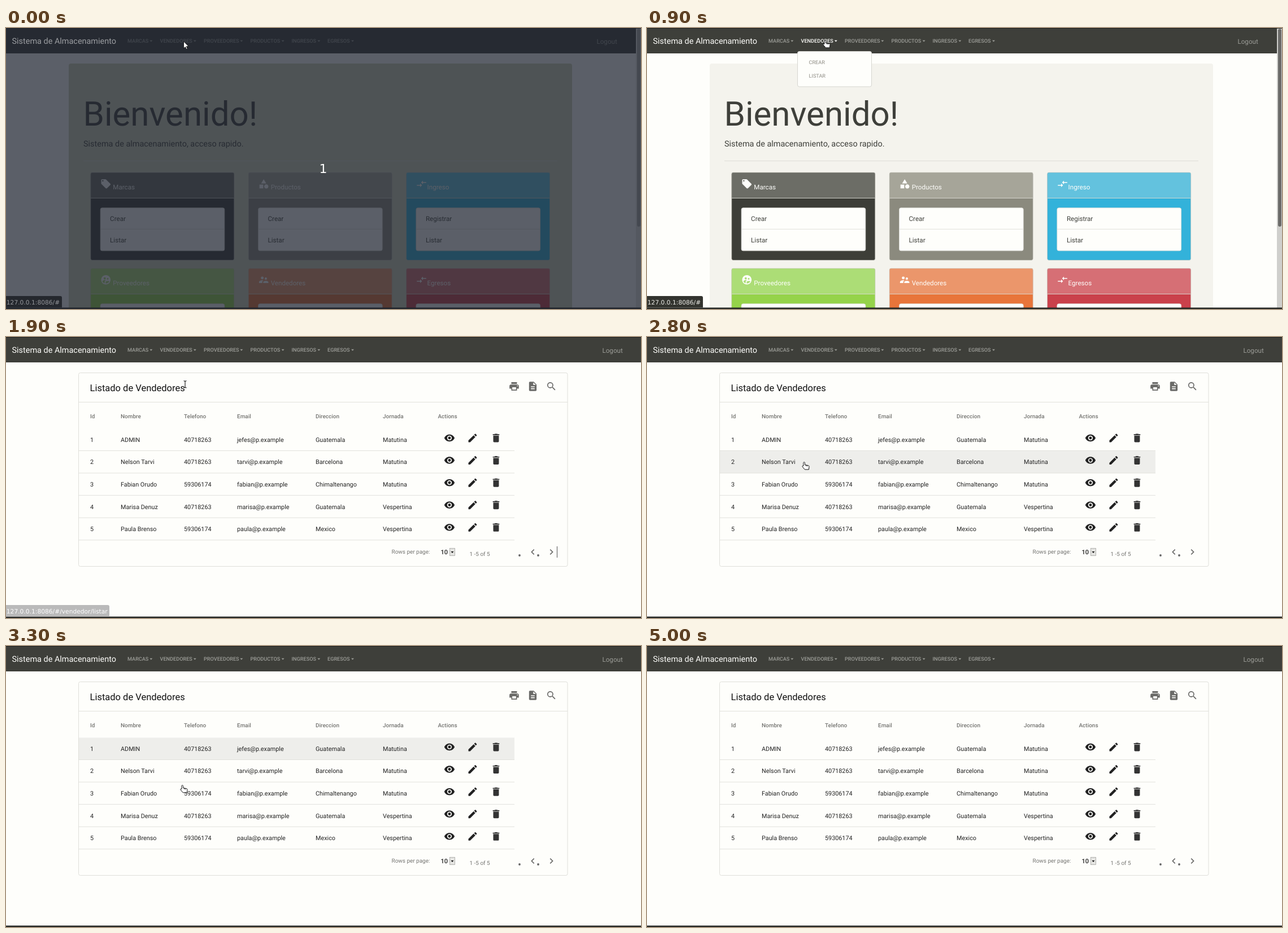
Write an HTML page that moves like this. It is 1124x498 px and loops after 5.8 s.

```html
<!DOCTYPE html>
<html lang="es">
<head>
<meta charset="utf-8">
<title>Sistema de Almacenamiento</title>
<style>
html, body { margin: 0; width: 100%; height: 100%; overflow: hidden; background: #fefefb; }
svg { display: block; width: 1124px; height: 498px; }
text { font-family: Roboto, sans-serif; text-rendering: geometricPrecision; white-space: pre; }
.sys { font-family: "DejaVu Sans", sans-serif; }
</style>
</head>
<body>
<svg id="stage" viewBox="0 0 1124 498"></svg>
<script>
const LOOP = 5800;
const INK = '#3e3f3a', PAPER = '#fefefb', SAND = '#f4f3ed', LINE = '#dfdfda', GREY = '#757572';

const ICONS = {
  tag: 'M21.41 11.58l-9-9C12.05 2.22 11.55 2 11 2H4c-1.1 0-2 .9-2 2v7c0 .55.22 1.05.59 1.42l9 9c.36.36.86.58 1.41.58s1.05-.22 1.41-.59l7-7c.37-.36.59-.86.59-1.41s-.23-1.06-.59-1.42zM5.5 7C4.67 7 4 6.33 4 5.5S4.67 4 5.5 4 7 4.67 7 5.5 6.33 7 5.5 7z',
  shapes: 'M12 2l-5.5 9h11zM3 13.5h8v8H3zM17.5 13a4.5 4.5 0 1 0 .01 0z',
  arrows: 'M9.01 14H2v2h7.01v3L13 15l-3.99-4v3zm5.98-1v-3H22V8h-7.01V5L11 9l3.99 4z',
  people: 'M16.5 12a2.5 2.5 0 1 0 0-5 2.5 2.5 0 0 0 0 5zM9 11a3 3 0 1 0 0-6 3 3 0 0 0 0 6zm7.5 3c-1.83 0-5.5.92-5.5 2.75V19h11v-2.25c0-1.83-3.67-2.75-5.5-2.75zM9 13c-2.33 0-7 1.17-7 3.5V19h7v-2.25c0-.85.33-2.34 2.37-3.47C10.5 13.1 9.66 13 9 13z',
  disc: 'M12 2a10 10 0 1 0 .01 0z',
  discHoles: 'M9.6 6.6a2.3 2.3 0 1 0 .01 0zM15.9 8a1.8 1.8 0 1 0 .01 0zM4.6 15.2c1-1.9 3.2-2.6 5-2.6 1 0 1.8.1 2.5.4-2 1-2.6 2.400-2.600 3.600V19.600c-2.200-.7-4-2.300-4.900-4.400zM11.500 19.800v-3c0-1.600 2.400-2.500 4.400-2.500 1.400 0 2.700.4 3.600 1-1.300 2.700-4.500 4.700-8 4.500z',
  print: 'M19 8H5c-1.66 0-3 1.34-3 3v6h4v4h12v-4h4v-6c0-1.66-1.34-3-3-3zm-3 11H8v-5h8v5zm3-7c-.55 0-1-.45-1-1s.45-1 1-1 1 .45 1 1-.45 1-1 1zm-1-9H6v4h12V3z',
  doc: 'M14 2H6c-1.1 0-1.99.9-1.99 2L4 20c0 1.1.89 2 1.99 2H18c1.1 0 2-.9 2-2V8l-6-6zm2 16H8v-2h8v2zm0-4H8v-2h8v2zm-3-5V3.5L18.5 9H13z',
  search: 'M15.5 14h-.79l-.28-.27A6.5 6.5 0 1 0 13.73 14.43l.27.28v.79l5 4.99L20.49 19zM9.5 14a4.5 4.5 0 1 1 0-9 4.5 4.5 0 0 1 0 9z',
  eye: 'M12 4.5C7 4.5 2.73 7.61 1 12c1.73 4.39 6 7.5 11 7.5s9.27-3.11 11-7.5c-1.73-4.39-6-7.5-11-7.5zM12 17a5 5 0 1 1 0-10 5 5 0 0 1 0 10zm0-8a3 3 0 1 0 0 6 3 3 0 0 0 0-6z',
  edit: 'M3 17.25V21h3.75L17.81 9.94l-3.75-3.75zM20.71 7.04c.39-.39.39-1.02 0-1.41l-2.34-2.34c-.39-.39-1.02-.39-1.41 0l-1.83 1.83 3.75 3.75z',
  bin: 'M6 19c0 1.1.9 2 2 2h8c1.1 0 2-.9 2-2V7H6v12zM19 4h-3.5l-1-1h-5l-1 1H5v2h14V4z',
  prev: 'M15.41 7.41L14 6l-6 6 6 6 1.41-1.41L10.83 12z',
  next: 'M10 6L8.59 7.41 13.17 12l-4.58 4.59L10 18l6-6z'
};

const text = (x, y, size, fill, str, extra = '') =>
  `<text x="${x}" y="${y}" font-size="${size}" fill="${fill}" ${extra}>${str}</text>`;
const rect = (x, y, w, h, fill, extra = '') =>
  `<rect x="${x}" y="${y}" width="${w}" height="${h}" fill="${fill}" ${extra}/>`;
const hline = (x1, x2, y, color = LINE) =>
  `<path d="M${x1} ${y}H${x2}" stroke="${color}" stroke-width=".9"/>`;
const icon = (name, cx, cy, fill) =>
  `<path d="${ICONS[name]}" fill="${fill}" fill-rule="evenodd" transform="translate(${cx - 10} ${cy - 10}) scale(.83)"/>`;
const group = (id, body) => `<g id="${id}">${body}</g>`;

function navItem([label, x, caretX], i) {
  return `<g id="nav${i}" fill="#9c9d98">` +
    `<text x="${x}" y="26.300" font-size="9.130" font-weight="500">${label}</text>` +
    `<path d="M${caretX} 21.800h5l-2.500 2.600z"/></g>`;
}

function card(x, y, [title, iconName, head, body, first]) {
  const gap = iconName === 'arrows' ? 37 : 39.5;
  return rect(x, y, 254, 155.5, body, 'rx="3"') +
    `<path d="M${x} ${y + 45.5}v-42.500q0-3 3-3h248q3 0 3 3v42.500z" fill="${head}"/>` +
    hline(x, x + 254, y + 45.5, '#dcdcd4') +
    rect(x, y, 254, 155.5, 'none', 'rx="3" stroke="#c6c6be" stroke-opacity=".7" stroke-width=".9"') +
    icon(iconName, x + 27, y + 20.3, '#fefefb') +
    (iconName === 'disc' ? icon('discHoles', x + 27, y + 20.3, head) : '') +
    text(x + gap, y + 30.3, 11.62, '#fefefb', title) +
    rect(x + 17.3, y + 62.8, 219.700, 76, PAPER, `rx="3" stroke="${LINE}" stroke-width=".8"`) +
    hline(x + 17.3, x + 237, y + 100.5) +
    text(x + 34.3, y + 85.5, 11.62, INK, first) +
    text(x + 34.3, y + 123.500, 11.62, INK, 'Listar');
}

const nav = [
  ['MARCAS', 215, 254.3], ['VENDEDORES', 272.5, 331.8], ['PROVEEDORES', 350, 414.3],
  ['PRODUCTOS', 432.5, 487.600], ['INGRESOS', 505.5, 551.3], ['EGRESOS', 569, 611]
];
const cards = [
  ['Marcas', 'tag', '#6c6d66', '#3d3e38', 'Crear'],
  ['Productos', 'shapes', '#a6a599', '#8b8a7e', 'Crear'],
  ['Ingreso', 'arrows', '#63c2de', '#33b2da', 'Registrar'],
  ['Proveedores', 'disc', '#acdd76', '#95d34a', 'Crear'],
  ['Vendedores', 'people', '#eb966b', '#e8753a', 'Crear'],
  ['Egresos', 'arrows', '#d66f75', '#ca414b', 'Registrar']
];

const home =
  rect(111, 63, 891, 440, SAND, 'id="jumbo" rx="4"') +
  text(136.5, 172.5, 60, INK, 'Bienvenido!') +
  text(137, 209.5, 14.45, INK, 'Sistema de almacenamiento, acceso rapido.') +
  hline(137, 976, 235.5, '#dcdbd5') +
  cards.map((c, i) => card(149.8 + (i % 3) * 279.4, i < 3 ? 256 : 426, c)).join('');

const scrollbar = rect(1115, 0, 9, 498, '#e2e2df', 'id="track"') +
  rect(1117, 1.5, 6, 350.5, '#a9a9a6', 'id="thumb" rx="3"');

const menu = rect(266.5, 41.5, 131, 62.5, PAPER, 'rx="3" stroke="#d6d6d0"') +
  rect(267, 48, 130, 24.500, SAND, 'id="menuHover"') +
  text(286.5, 63.6, 9.13, '#8e8c84', 'CREAR') +
  text(286.5, 88.4, 9.13, '#8e8c84', 'LISTAR');

const columns = [149, 203, 315, 409, 548, 667, 764.5];
const headings = ['Id', 'Nombre', 'Telefono', 'Email', 'Direccion', 'Jornada', 'Actions'];
const people = [
  ['ADMIN', '40718263', 'jefes@p.example', 'Guatemala', 'Matutina'],
  ['Nelson Tarvi', '40718263', 'tarvi@p.example', 'Barcelona', 'Matutina'],
  ['Fabian Orudo', '59306174', 'fabian@p.example', 'Chimaltenango', 'Matutina'],
  ['Marisa Denuz', '40718263', 'marisa@p.example', 'Guatemala', 'Vespertina'],
  ['Paula Brenso', '59306174', 'paula@p.example', 'Mexico', 'Vespertina']
];
const PITCH = 39.6;

function tableRow(person, i) {
  const dy = i * PITCH;
  return [i + 1, ...person].map((v, c) => text(columns[c], 185.8 + dy, 10.8, '#222', v)).join('') +
    icon('eye', 785, 179 + dy, '#222') +
    icon('edit', 826, 179 + dy, '#222') +
    icon('bin', 867.5, 179 + dy, '#333') +
    hline(129, 900, 201.5 + dy);
}

const list =
  rect(128.5, 63.5, 865.5, 343, PAPER, `rx="3" stroke="${LINE}"`) +
  rect(129, 162.5, 771, 39, '#eeeeeb', 'id="rowHover"') +
  text(148.5, 95.5, 16.5, '#111', 'Listado de Vendedores') +
  ['print', 'doc', 'search'].map((n, i) => icon(n, 899.5 + i * 33, 87.5, '#6a6a68')).join('') +
  hline(129, 994, 115.5) +
  headings.map((h, i) => text(columns[i], 143.8, 9.96, GREY, h, 'font-weight="500"')).join('') +
  people.map(tableRow).join('') +
  text(682.5, 384.3, 9.96, GREY, 'Rows per page:') +
  text(769.5, 384.5, 11, '#222', '10', 'font-weight="500"') +
  rect(785.5, 374.5, 9, 13, '#e4e4e1', 'stroke="#a5a5a2" stroke-width=".8"') +
  '<path d="M787.500 380h5l-2.500 3z" fill="#111"/>' +
  text(820.5, 387.500, 9.96, GREY, '1 -5 of 5') +
  '<circle cx="909" cy="387" r="1.900" fill="#666"/><circle cx="942" cy="387" r="1.900" fill="#666"/>' +
  icon('prev', 932.5, 381, '#6a6a68') + icon('next', 965.5, 381, '#6a6a68') +
  rect(975, 371, 1, 20, '#555', 'id="caret"');

const outline = 'fill="#fff" stroke="#111" stroke-linejoin="round"';
const pointers = {
  arrow: `<path d="M.5.8V13l2.900-2.500 1.900 4.100 1.900-.9-1.900-4h4z" ${outline} stroke-width=".9"/>`,
  hand: `<path d="M4 .7c1 0 1.500.7 1.500 1.500v3.300l6 1.200c1 .2 1.600 1 1.500 2l-.6 5.200H5.300L1 8.800c-.6-.9.4-2 1.400-1.400l.5.300V2.200C2.900 1.400 3.300.7 4 .7zM7.600 8v-2M9.900 8.400V6.600" ${outline} stroke-width="1"/>`,
  beam: '<path d="M-2.500.7q2 0 2.500 1 .5-1 2.500-1M0 1.500v10.500M-2.500 12.900q2 0 2.500-1 .5 1 2.500 1" fill="none" stroke="#111" stroke-width="1.100"/>'
};

document.getElementById('stage').innerHTML =
  rect(0, 0, 1124, 498, PAPER) +
  group('home', home) + group('list', list) +
  rect(0, 0, 1124, 45, INK) + group('bar', scrollbar) +
  nav.map(navItem).join('') +
  text(0, 27.5, 11.62, '#9c9d98', 'Logout', 'id="logout"') +
  group('menu', menu) +
  rect(0, 0, 1124, 1, '#1d1e1c') + rect(0, 495.5, 1124, 2.5, '#262825') +
  rect(0, 0, 1124, 498, '#1e2330', 'id="shade" fill-opacity=".72"') +
  text(10.5, 28, 14.45, PAPER, 'Sistema de Almacenamiento', 'id="brand"') +
  group('status', '<path id="statusBox"/>' + text(.8, 489.6, 10.7, '#eee', '', 'id="url" class="sys"')) +
  text(554.500, 257, 22, '#fff', '1', 'id="count" class="sys"') +
  Object.keys(pointers).map(k => group(k, pointers[k])).join('');

const el = {};
document.querySelectorAll('[id]').forEach(n => el[n.id] = n);

const HOST = '127.0.0.1:8086/#';
// Each step overrides part of the state; cur is [pointer, x, y], row and item count from 1.
const steps = [
  [0, { page: 'home', dim: true, cur: ['arrow', 314, 23], url: HOST }],
  [100, { dim: false, cur: ['hand', 311, 21], active: true }],
  [900, { menu: true, dark: true }],
  [1200, { cur: ['hand', 311, 42], item: 1, url: HOST + '/vendedor/crear' }],
  [1300, { cur: ['hand', 311, 61] }],
  [1400, { cur: ['hand', 311, 78], item: 2, url: HOST + '/vendedor/listar' }],
  [1600, { cur: ['hand', 311, 80] }],
  [1900, { page: 'list', menu: false, active: false, cur: ['beam', 317, 77], fading: true, caret: true }],
  [2000, { url: '' }],
  [2600, { cur: ['arrow', 303, 117], caret: false }],
  [2700, { cur: ['hand', 285, 168], row: 1 }],
  [2800, { cur: ['hand', 274, 221], row: 2 }],
  [2900, { cur: ['hand', 278, 284], row: 4 }],
  [3000, { cur: ['hand', 288, 345], row: 5 }],
  [3100, { cur: ['arrow', 298, 398], row: 0 }],
  [3200, { cur: ['hand', 303, 335], row: 4 }],
  [3300, { cur: ['hand', 308, 246], row: 1 }],
  [3400, { cur: ['arrow', 327, 160], row: 0 }],
  [3600, { cur: ['arrow', 331, 141] }],
  [3700, { cur: ['arrow', 334, 124] }],
  [4200, { cur: ['arrow', 312, 112] }],
  [4300, { cur: ['arrow', 268, 88] }],
  [4400, { cur: ['arrow', 218, 62] }],
  [4500, { cur: ['arrow', 164, 36], caret: true }],
  [4600, { cur: ['arrow', 112, 13] }],
  [4700, { cur: ['arrow', 78, 0] }],
  [4800, { cur: null }],
  [5000, { caret: false }]
];

const show = (id, on) => el[id].setAttribute('visibility', on ? 'inherit' : 'hidden');
const set = (id, name, value) => el[id].setAttribute(name, value);

function render(s) {
  const atHome = s.page === 'home';
  show('home', atHome);
  show('bar', atHome);
  show('list', !atHome);
  show('menu', s.menu);
  show('shade', s.dim);
  show('count', s.dim);
  show('caret', s.caret);
  show('rowHover', s.row);
  show('menuHover', s.item);
  show('status', s.url);
  set('logout', 'x', atHome ? 1045.5 : 1055.5);
  set('jumbo', 'fill', s.dim ? '#cfd2b8' : SAND);
  set('brand', 'fill', s.dim ? '#9b9da1' : PAPER);
  set('nav1', 'fill', s.active ? PAPER : '#9c9d98');
  set('thumb', 'fill', s.dark ? '#6b6b69' : '#a9a9a6');
  set('track', 'fill', s.dark ? '#cfcfcc' : '#e2e2df');
  if (s.row) set('rowHover', 'y', 162.5 + (s.row - 1) * PITCH);
  if (s.item) set('menuHover', 'y', 48 + (s.item - 1) * 24.7);
  if (s.url) {
    el.url.textContent = s.url;
    const w = s.url === HOST ? 99 : s.url.endsWith('listar') ? 183 : 182;
    set('statusBox', 'd', `M0 475h${w - 3}q3 0 3 3v17.500H0z`);
    set('statusBox', 'fill', s.dim ? '#25282e' : s.fading ? '#bababa' : '#33342f');
    set('url', 'fill', s.dim ? '#96989c' : s.fading ? '#fff' : '#eeeeea');
  }
  for (const k in pointers) {
    const on = s.cur && s.cur[0] === k;
    show(k, on);
    if (on) set(k, 'transform', `translate(${s.cur[1]} ${s.cur[2]})`);
  }
}

const start = performance.now();
let last = -1;
function tick() {
  const t = (performance.now() - start) % LOOP;
  const past = steps.filter(([at]) => at <= t);
  if (past.length !== last) {
    last = past.length;
    render(Object.assign({}, ...past.map(p => p[1])));
  }
  requestAnimationFrame(tick);
}
tick();
</script>
</body>
</html>
```
